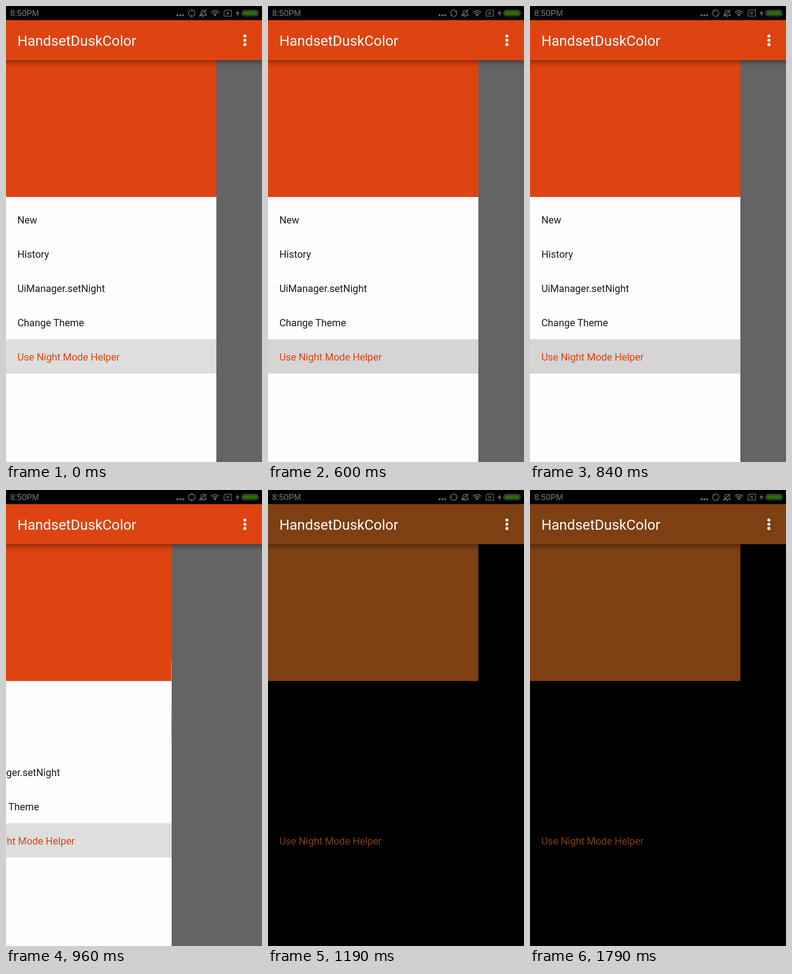
Animation, 561 px wide and 998 px high, one loop 2.03 s. Source, as an HTML page:

```html
<!DOCTYPE html>
<html lang="en">
<head>
<meta charset="utf-8">
<title>Night mode drawer</title>
<style>
  html, body { margin: 0; width: 100%; height: 100%; overflow: hidden; background: #000; }
  svg { display: block; width: 100vw; height: 100vh; font-family: Roboto, sans-serif; }

  /* Every state change is a hard cut on one shared 2030 ms clock. */
  svg { animation: theme 2030ms step-end infinite; }
  .app { animation: blackout 2030ms step-end infinite; }
  .drawer { animation: slide 2030ms step-end infinite; }
  .row { animation: press 2030ms step-end infinite; }
  .sync { transform-origin: 407px 15.8px; animation: spin 2030ms step-end infinite; }

  @keyframes theme {
    0% { --accent: #de4412; --paper: #fdfdfe; --ink: #1b1b1b; --scrim: #646466; }
    58.62%, 100% { --accent: #7e3f13; --paper: #000; --ink: #000; --scrim: #000; }
  }
  @keyframes blackout {
    0% { visibility: visible; }
    52.7% { visibility: hidden; }
    58.62%, 100% { visibility: visible; }
  }
  @keyframes slide {
    0% { transform: none; }
    47.29% { transform: translateX(-98.5px); }
    52.7%, 100% { transform: none; }
  }
  @keyframes press {
    0% { fill: #dedede; }
    29.55% { fill: #d5d5d5; }
    35.46% { fill: #cbcbcb; }
    41.37% { fill: #d5d5d5; }
    47.29% { fill: #dedede; }
    58.62%, 100% { fill: #000; }
  }
  @keyframes spin {
    0% { transform: rotate(0deg); }
    5.91% { transform: rotate(45deg); }
    11.82% { transform: rotate(90deg); }
    17.73% { transform: rotate(135deg); }
    29.55% { transform: rotate(225deg); }
    35.46% { transform: rotate(270deg); }
    41.37% { transform: rotate(315deg); }
    47.29% { transform: rotate(360deg); }
    52.7% { transform: rotate(405deg); }
    58.62% { transform: rotate(450deg); }
    64.53% { transform: rotate(495deg); }
    70.44% { transform: rotate(540deg); }
    76.35% { transform: rotate(585deg); }
    88.17%, 100% { transform: rotate(675deg); }
  }

  .accent { fill: var(--accent); }
  .paper { fill: var(--paper); }
  .scrim { fill: var(--scrim); }
  .items { fill: var(--ink); font-size: 21.8px; }
  .title { fill: #fff; font-size: 31.2px; }
  .clock { font: 18.3px "Liberation Sans", Arial, sans-serif; stroke: #6c6c6c; stroke-width: .3; }
  .solid { fill: #6c6c6c; }
  .line { fill: none; stroke: #6c6c6c; stroke-width: 1.7; }
</style>
</head>
<body>
<svg viewBox="0 0 561 998" preserveAspectRatio="none">
  <defs>
    <linearGradient id="shade" x1="0" y1="0" x2="0" y2="1">
      <stop offset="0" stop-opacity=".4"/>
      <stop offset=".25" stop-opacity=".2"/>
      <stop offset=".6" stop-opacity=".06"/>
      <stop offset="1" stop-opacity="0"/>
    </linearGradient>
  </defs>
  <rect width="561" height="998"/>

  <g class="app">
    <rect class="scrim" y="118" width="561" height="880"/>
    <g class="drawer">
      <rect class="paper" y="417" width="461" height="581"/>
      <rect class="accent" y="118" width="461" height="300"/>
      <rect class="row" y="729.5" width="461" height="75"/>
      <g class="items">
        <text x="24.9" y="476.3">New</text>
        <text x="24.9" y="551.1">History</text>
        <text x="24.9" y="625.9">UiManager.setNight</text>
        <text x="24.9" y="700.7">Change Theme</text>
        <text class="accent" x="24.9" y="775.5">Use Night Mode Helper</text>
      </g>
    </g>
    <rect fill="url(#shade)" y="118.5" width="561" height="17"/>
    <rect class="accent" y="31" width="561" height="87.5"/>
    <text class="title" x="24.9" y="87">HandsetDuskColor</text>
    <g fill="#fff">
      <circle cx="523.5" cy="65.8" r="3.3"/>
      <circle cx="523.5" cy="75.1" r="3.3"/>
      <circle cx="523.5" cy="84.4" r="3.3"/>
    </g>
  </g>

  <g class="solid">
    <text class="clock" x="9.3" y="22.4">8:50PM</text>
    <circle cx="375.7" cy="20.3" r="2.3"/>
    <circle cx="381.9" cy="20.3" r="2.3"/>
    <circle cx="388.1" cy="20.3" r="2.3"/>
    <path d="M509 8.5l-6 8.2h4l-2 6.8 7-9h-4.3z"/>
    <circle cx="458" cy="20.4" r="1.9"/>
  </g>
  <g class="line">
    <g class="sync">
      <path d="M409 9.1a7 7 0 0 1 0 13.4M405 22.5a7 7 0 0 1 0-13.4"/>
      <path class="solid" stroke="none" d="M405.5 6.6l4.3 2.3-3.2 3.6zM408.5 25l-4.3-2.3 3.2-3.6z"/>
    </g>
    <path d="M425 20.3c2.5-2 2.2-4 2.3-6.3 .2-6 9.2-6 9.4 0 .1 2.3-.2 4.3 2.3 6.3zM430 22.8h4M424 23.2L439.3 7.8"/>
    <path d="M449 13.8a13 13 0 0 1 18 0M452 16.6a8.8 8.8 0 0 1 12 0M455 19a4.6 4.6 0 0 1 6 0" stroke-width="1.9"/>
    <path d="M481 9h13v13.2h-16.2v-10zM482.8 12.8l6 6M488.8 12.8l-6 6" stroke-width="1.5"/>
    <rect x="516.5" y="9.4" width="36.5" height="12.6" rx="6.3" stroke-width="1.2"/>
  </g>
  <rect x="518.2" y="11.1" width="33.1" height="9.2" rx="4.6" fill="#2a6c04"/>
</svg>
</body>
</html>
```
